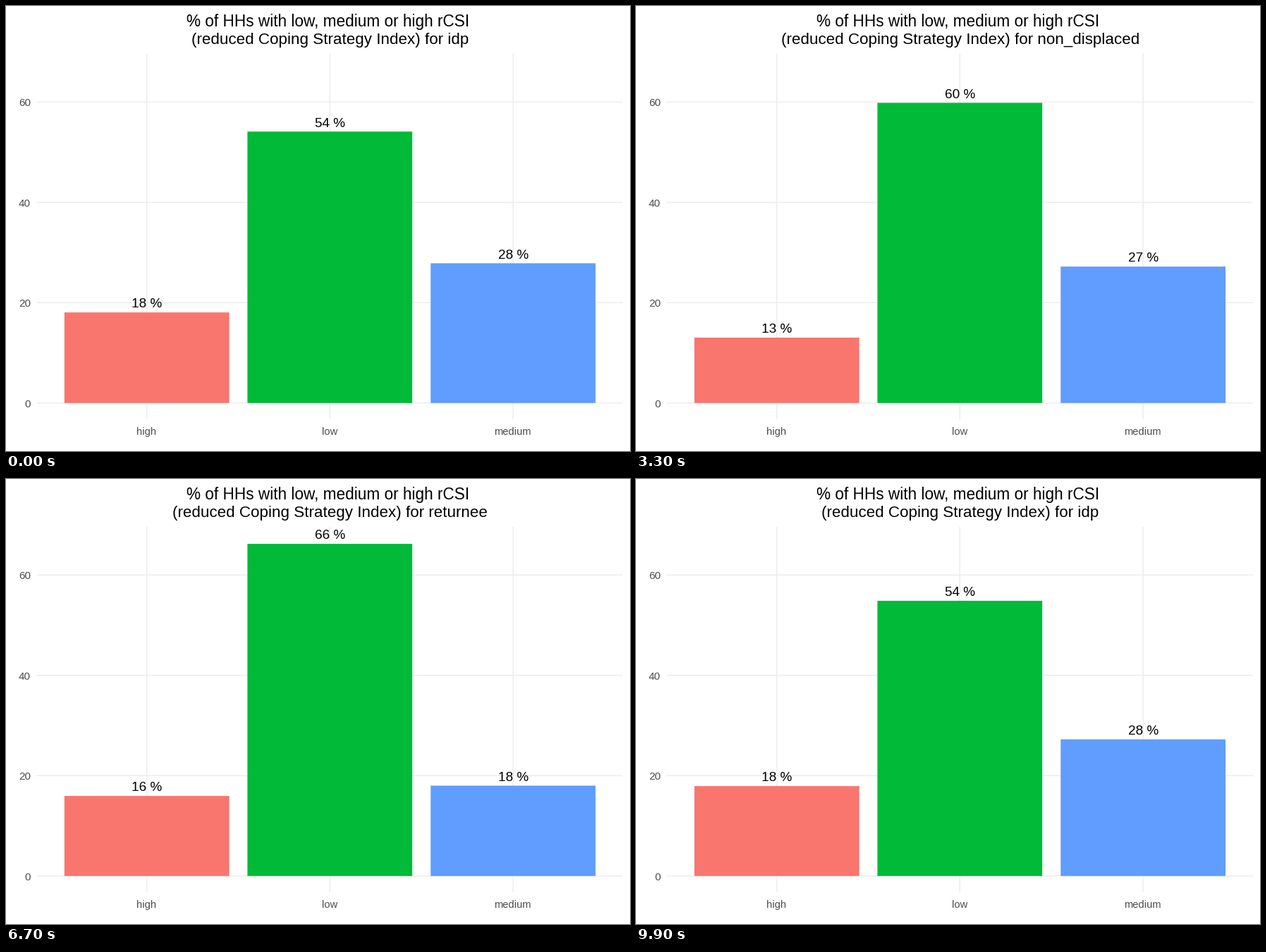
Recreate the animation shown at these times as a matplotlib script. Size 885 px wide and 632 px high, loop 10 s.

```python
import matplotlib.pyplot as plt
from matplotlib.animation import FuncAnimation
from matplotlib.patches import Rectangle

W, H, DPI = 885, 632, 100
FRAMES, STEP = 100, 100
BASE, UNIT = 563.8, 7.125        # y of zero, pixels per percent
CENTERS = (199.7, 459.3, 719.2)
BAR_W = 233.8
COLORS = ("#F8766D", "#00BA38", "#619CFF")
LEVELS = ("high", "low", "medium")
GRID = "#EBEBEB"

STATES = (
    ("idp", (18.05, 54.1, 27.85)),
    ("non_displaced", (13.03, 59.83, 27.19)),
    ("returnee", (15.95, 66.2, 18.0)),
)
# first and last frame of each move to the next state
MOVES = ((16, 33), (50, 67), (84, 100))

plt.rcParams["font.family"] = "Liberation Sans"
fig = plt.figure(figsize=(W / DPI, H / DPI), dpi=DPI, facecolor="white")
ax = fig.add_axes([0, 0, 1, 1])
ax.set_xlim(0, W)
ax.set_ylim(H, 0)
ax.axis("off")


def px(size):
    return size * 72 / DPI


def write(x, y, text, size, color="black", ha="center"):
    return ax.text(x, y, text, fontsize=px(size), color=color, ha=ha,
                   va="baseline", zorder=4)


def height_y(value):
    return BASE - value * UNIT


def grid_line(xs, ys):
    ax.plot(xs, ys, color=GRID, lw=px(1.4), solid_capstyle="butt",
            snap=False, zorder=1)


for tick in (0, 20, 40, 60):
    y = height_y(tick)
    grid_line((43.5, 875), (y, y))
    write(35, y + 6.2, str(tick), 15.2, "#4D4D4D", "right")

for x, name in zip(CENTERS, LEVELS):
    grid_line((x, x), (68, 587))
    write(x - 0.5, 609, name, 14.7, "#4D4D4D")

write(456.3, 29, "% of HHs with low, medium or high rCSI", 22.6)
title = write(459.8, 54, "", 22.4)

bars, labels = [], []
for x, color in zip(CENTERS, COLORS):
    bar = Rectangle((x - BAR_W / 2, BASE), BAR_W, 0, fc=color, lw=0,
                    snap=False, zorder=2)
    bars.append(ax.add_patch(bar))
    labels.append(write(x, BASE, "", 19))


def pose(frame):
    """Current state, next state, progress, and whether the title has switched."""
    for i, (start, end) in enumerate(MOVES):
        if frame < end:
            done = max(0, frame - start)
            span = end - start
            return (STATES[i], STATES[(i + 1) % len(STATES)],
                    done / span, done > (span + 1) // 2)
    return STATES[0], STATES[0], 0, False


def update(frame):
    (group, old), (next_group, new), p, switched = pose(frame)
    shown = next_group if switched else group
    title.set_text(f"(reduced Coping Strategy Index) for {shown}")
    for bar, label, a, b in zip(bars, labels, old, new):
        top = height_y(a + (b - a) * p)
        bar.set_y(top)
        bar.set_height(BASE - top)
        label.set_y(top - 6.7)
        label.set_text(f"{b if p >= 0.5 else a:.0f} %")
    return [title, *bars, *labels]


anim = FuncAnimation(fig, update, frames=FRAMES, interval=STEP,
                     init_func=lambda: update(0), repeat=True, repeat_delay=0)
plt.show()
```
